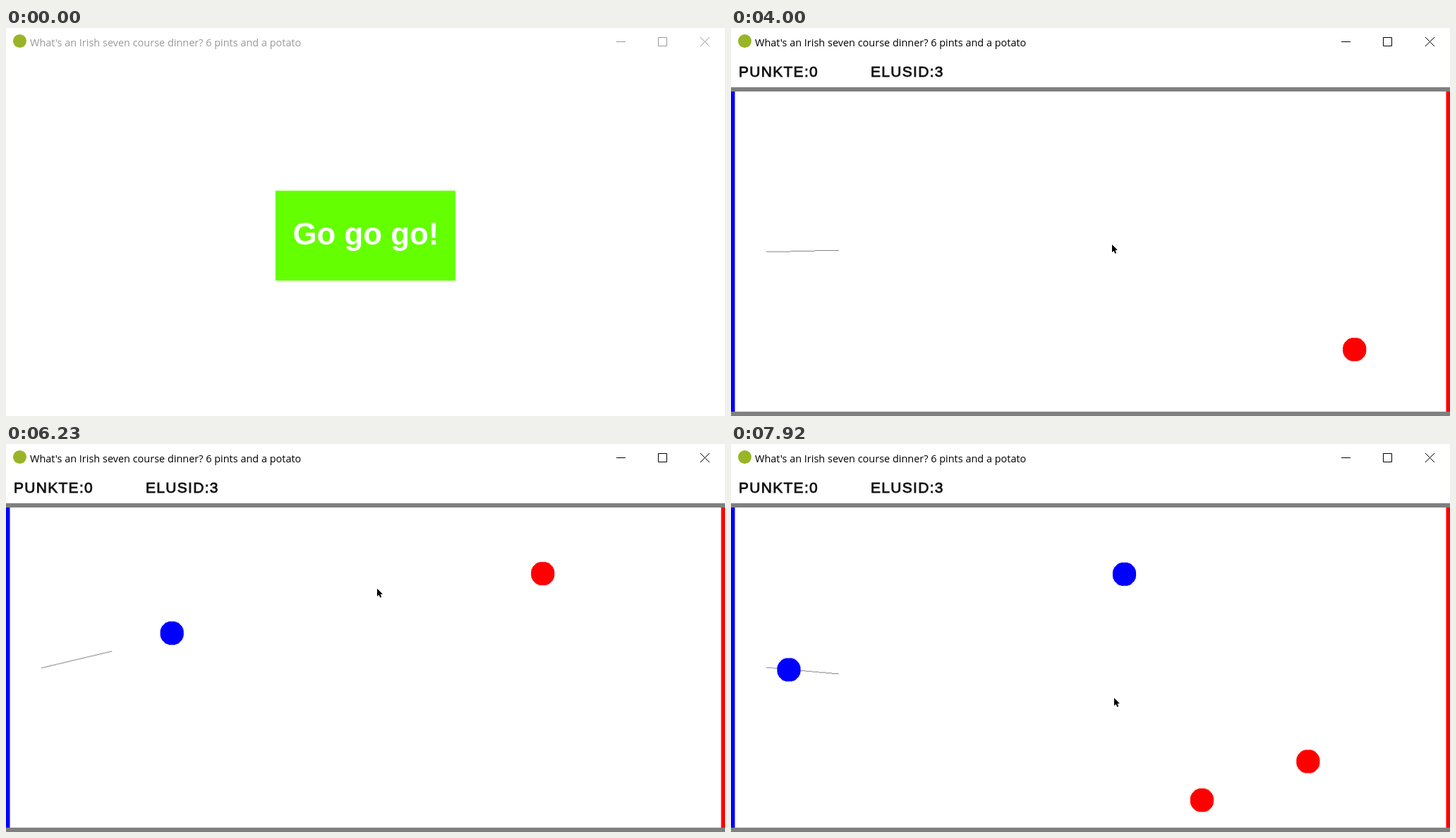
Animation, 1019 px wide and 550 px high, one loop 8000 ms. Source, as an HTML page with a canvas:

```html
<!DOCTYPE html>
<html lang="en">
<head>
<meta charset="utf-8">
<title>Ball game</title>
<style>
  html, body { margin: 0; width: 100%; height: 100%; overflow: hidden; background: #fff; }
  canvas { display: block; }
</style>
</head>
<body>
<canvas id="stage" width="1019" height="550"></canvas>
<script>
const ctx = document.getElementById('stage').getContext('2d');
const W = 1019, H = 550, LOOP = 8000;

// The game advances in ticks; tick 0 is the first ball's launch.
const TICK = 76.9, LAUNCH = 2453;
const ACTIVE_TICK = -18, GAME_TICK = -16;

const SCALE = 0.85;  // size of one game pixel
const RADIUS = 20;   // in game pixels
const TOP = 108, BOTTOM = 523.75;
const RED = '#ff0000', BLUE = '#0000ff', GRAY = '#808080';
const AIM = { x: 50, y: 316.6, length: 103 };

const balls = [
  { color: RED, start: 0, x: 968.5, y: 299.8, vx: -4.24, vy: 14.6 },
  { color: BLUE, start: 37, x: 59.4, y: 313.7, vx: 14.65, vy: -3.8 },
  { color: RED, start: 57, x: 968.5, y: 298.4, vx: -10.76, vy: 10.83 },
  { color: BLUE, start: 69, x: 51.8, y: 317.3, vx: 15.1, vy: 1.35 }
];

// Pointer path: tick, x, y
const path = [
  [-30, 871, 528], [-29, 740, 452], [-28, 640, 401], [-25, 640, 401],
  [-19, 540, 307], [24, 540, 307], [32, 528, 217], [34, 526, 201],
  [37, 526, 195], [40, 526, 203], [49, 526, 205], [59, 525, 214],
  [62, 525, 214], [65, 533, 287], [68, 543, 360]
];

function pointerAt(tick) {
  const next = path.findIndex(p => p[0] > tick);
  if (next === 0) return null;
  if (next < 0) return path[path.length - 1].slice(1);
  const [t0, x0, y0] = path[next - 1], [t1, x1, y1] = path[next];
  const f = (tick - t0) / (t1 - t0);
  return [Math.round(x0 + (x1 - x0) * f), Math.round(y0 + (y1 - y0) * f)];
}

function bounce(y) {
  const span = BOTTOM - TOP;
  const d = (((y - TOP) % (2 * span)) + 2 * span) % (2 * span);
  return TOP + (d > span ? 2 * span - d : d);
}

function rect(color, x, y, w, h) {
  ctx.fillStyle = color;
  ctx.fillRect(x, y, w, h);
}

function text(str, x, y, font, color, spacing = 0) {
  ctx.font = font;
  ctx.letterSpacing = spacing + 'px';
  ctx.fillStyle = color;
  ctx.fillText(str, x, y);
}

function drawTitleBar(active) {
  const color = active ? '#000' : '#999';
  ctx.fillStyle = '#9ab428';
  ctx.beginPath();
  ctx.arc(19.5, 18.5, 9.5, 0, 2 * Math.PI);
  ctx.fill();
  text("What's an Irish seven course dinner? 6 pints and a potato",
    34, 25.5, '14.48px "Open Sans", sans-serif', color);
  ctx.strokeStyle = color;
  ctx.lineWidth = 1;
  ctx.beginPath();
  ctx.moveTo(865, 19.5);
  ctx.lineTo(878, 19.5);
  ctx.rect(924.5, 13.5, 12, 12);
  ctx.moveTo(984, 13);
  ctx.lineTo(997, 26);
  ctx.moveTo(997, 13);
  ctx.lineTo(984, 26);
  ctx.stroke();
}

function drawButton() {
  rect('#64ff00', 381.9, 230.6, 255, 127.5);
  text('Go go go!', 406.5, 307, 'bold 43.8px "Liberation Sans", Arial, sans-serif', '#fff');
}

// Score label: regular letters thickened by a fine outline
function label(str, x) {
  const y = 68.6;
  text(str, x, y, '21px "Liberation Sans", Arial, sans-serif', '#111', 1.3);
  ctx.strokeStyle = '#111';
  ctx.lineWidth = 0.8;
  ctx.strokeText(str, x, y);
}

function drawField() {
  label('PUNKTE:0', 10.9);
  label('ELUSID:3', 198);
  rect(BLUE, 0, 90, 5.5, 454);
  rect(RED, 1013.5, 90, 5.5, 454);
  rect(GRAY, 0, 84, W, 6);
  rect(GRAY, 0, 543.8, W, 6.2);
}

// Stepped one-pixel line pointing at the mouse, drawn on the game's own grid
function drawAim([px, py]) {
  const angle = Math.atan2(py - AIM.y, px - AIM.x);
  const width = AIM.length * Math.cos(angle);
  const rise = AIM.length * Math.sin(angle) / SCALE;
  const rows = Math.floor(Math.abs(rise)) + 1;
  const run = width / rows;
  for (let i = 0; i < rows; i++) {
    rect(GRAY, AIM.x + i * run, AIM.y + Math.sign(rise) * i * SCALE, run, 1);
  }
}

// Disc built from rows of game pixels, without smoothing
function drawBall(color, x, y) {
  ctx.fillStyle = color;
  ctx.beginPath();
  for (let row = 1 - RADIUS; row < RADIUS; row++) {
    const half = SCALE * Math.min(RADIUS - 0.5, Math.round(Math.sqrt(RADIUS ** 2 - row ** 2)));
    ctx.rect(x - half, y + (row - 0.5) * SCALE, 2 * half, SCALE);
  }
  ctx.fill();
}

function drawBalls(tick) {
  for (const b of balls) {
    const age = tick - b.start;
    if (age >= 0) drawBall(b.color, b.x + b.vx * age, bounce(b.y + b.vy * age));
  }
}

function drawPointer([x, y]) {
  const shape = [[0, 0], [0, 11], [2.5, 8.7], [4.3, 12.7], [6.2, 11.9], [4.5, 8], [7.8, 7.8]];
  ctx.beginPath();
  for (const [dx, dy] of shape) ctx.lineTo(x + dx, y + dy);
  ctx.closePath();
  ctx.strokeStyle = '#fff';
  ctx.lineWidth = 1.4;
  ctx.stroke();
  ctx.fillStyle = '#000';
  ctx.fill();
}

function draw(time) {
  const tick = Math.floor((time % LOOP - LAUNCH) / TICK);
  const pointer = pointerAt(tick);
  rect('#fff', 0, 0, W, H);
  drawTitleBar(tick >= ACTIVE_TICK);
  if (tick < GAME_TICK) {
    drawButton();
  } else {
    drawField();
    drawAim(pointer);
    drawBalls(tick);
  }
  if (pointer) drawPointer(pointer);
}

const begin = performance.now();
function loop() {
  draw(performance.now() - begin);
  requestAnimationFrame(loop);
}
loop();
</script>
</body>
</html>
```
